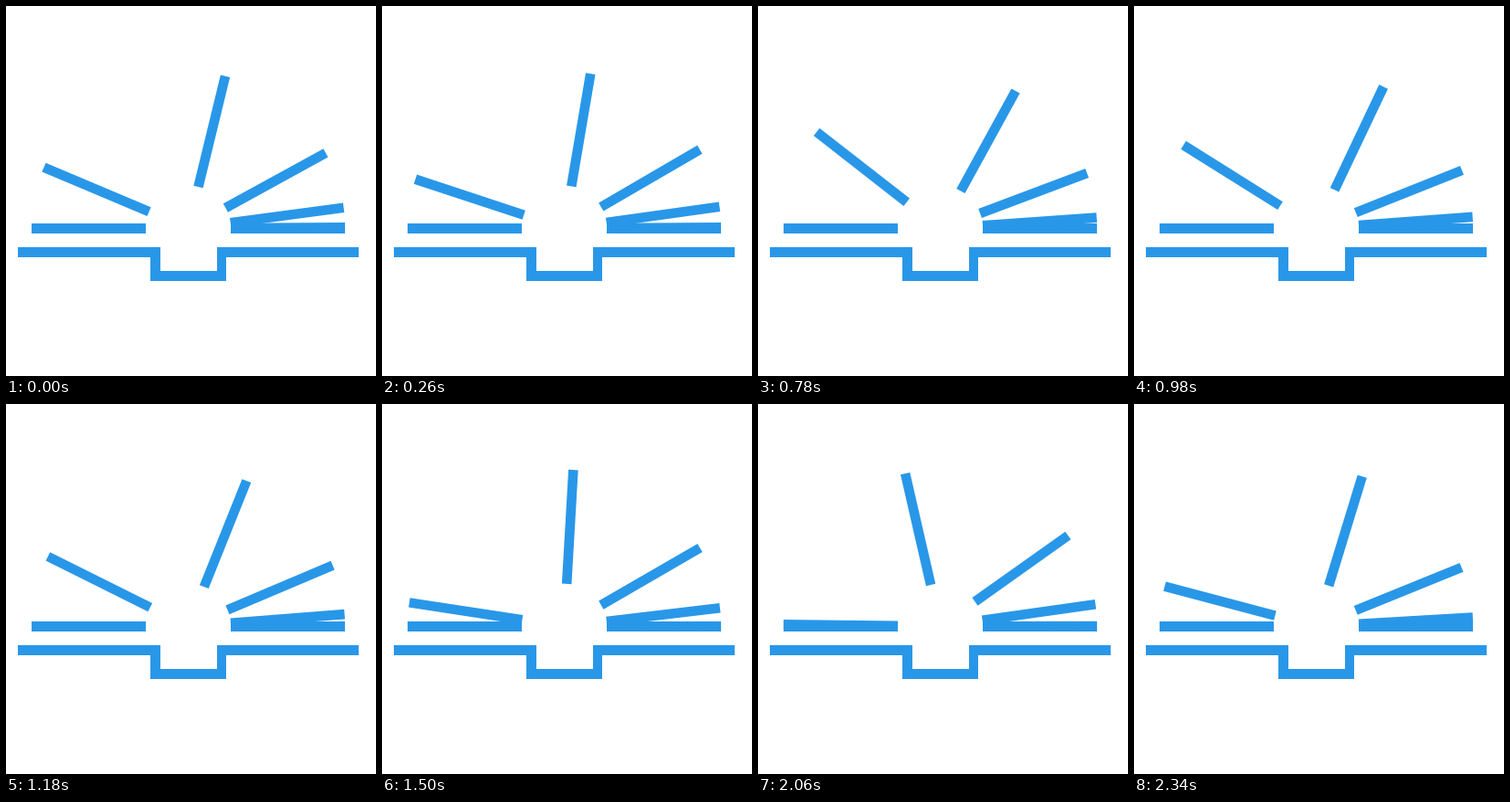
Write an HTML page that moves like this. It is 405 by 405 pixels and loops after 2380 ms.

```html
<!DOCTYPE html>
<html lang="en">
<head>
<meta charset="utf-8">
<title>Book loader</title>
<style>
  html, body { margin: 0; width: 100%; height: 100%; overflow: hidden; background: #fff; }
  svg { display: block; width: 100%; height: 100%; fill: #2997e8; }
</style>
</head>
<body>
<svg viewBox="0 0 405 405">
  <g shape-rendering="crispEdges">
    <!-- covers and spine -->
    <path d="M13 264H169V290H231V264H386V275H241V301H158V275H13Z"/>
    <!-- resting pages -->
    <rect x="28" y="238" width="125" height="11"/>
    <rect x="246" y="238" width="125" height="11"/>
  </g>
  <g id="pages"></g>
</svg>
<script>
const LOOP = 2380, FIRST = 100, STEP = 40;
const PAGES = 18;
const PIVOT = { x: 199.5, y: 243.4 };
const INNER = 46.6, LENGTH = 125, THICK = 10.6;

// Progress is in percent of the full page-turning cycle, advanced in ticks.
const START = 12.46, TICK = 0.2451;
const PACE = [[0, 0], [5, 7], [18, 24], [28, 38], [36, 51], [50, 72], [57, 82]]; // [step, tick]

const group = document.getElementById('pages');
const pages = Array.from({ length: PAGES }, () => {
  const page = document.createElementNS('http://www.w3.org/2000/svg', 'rect');
  page.setAttribute('x', PIVOT.x - INNER - LENGTH);
  page.setAttribute('y', PIVOT.y - THICK / 2);
  page.setAttribute('width', LENGTH);
  page.setAttribute('height', THICK);
  return group.appendChild(page);
});

// CSS "ease": cubic-bezier(.25, .1, .25, 1)
function ease(x) {
  if (x <= 0) return 0;
  if (x >= 1) return 1;
  let lo = 0, hi = 1;
  for (let i = 0; i < 24; i++) {
    const s = (lo + hi) / 2;
    if (0.75 * s - 0.75 * s * s + s * s * s < x) lo = s; else hi = s;
  }
  return 0.3 * lo + 2.4 * lo * lo - 1.7 * lo * lo * lo;
}

function tickAt(step) {
  const i = Math.max(1, PACE.findIndex(([s]) => step <= s));
  const [s0, t0] = PACE[i - 1], [s1, t1] = PACE[i];
  return Math.round(t0 + (t1 - t0) * (step - s0) / (s1 - s0));
}

function draw(time) {
  const step = time < FIRST ? 0 : 1 + Math.floor((time - FIRST) / STEP);
  const progress = START + TICK * tickAt(Math.min(step, 57));
  pages.forEach((page, i) => {
    const begin = 4 + 1.86 * i, end = 13 + 1.74 * i;
    const angle = 180 * ease((progress - begin) / (end - begin));
    const moving = angle > 0 && angle < 180;
    page.setAttribute('visibility', moving ? 'visible' : 'hidden');
    page.setAttribute('transform', `rotate(${angle.toFixed(3)} ${PIVOT.x} ${PIVOT.y})`);
  });
}

const origin = performance.now();
function loop() {
  draw((performance.now() - origin) % LOOP);
  requestAnimationFrame(loop);
}
loop();
</script>
</body>
</html>
```
